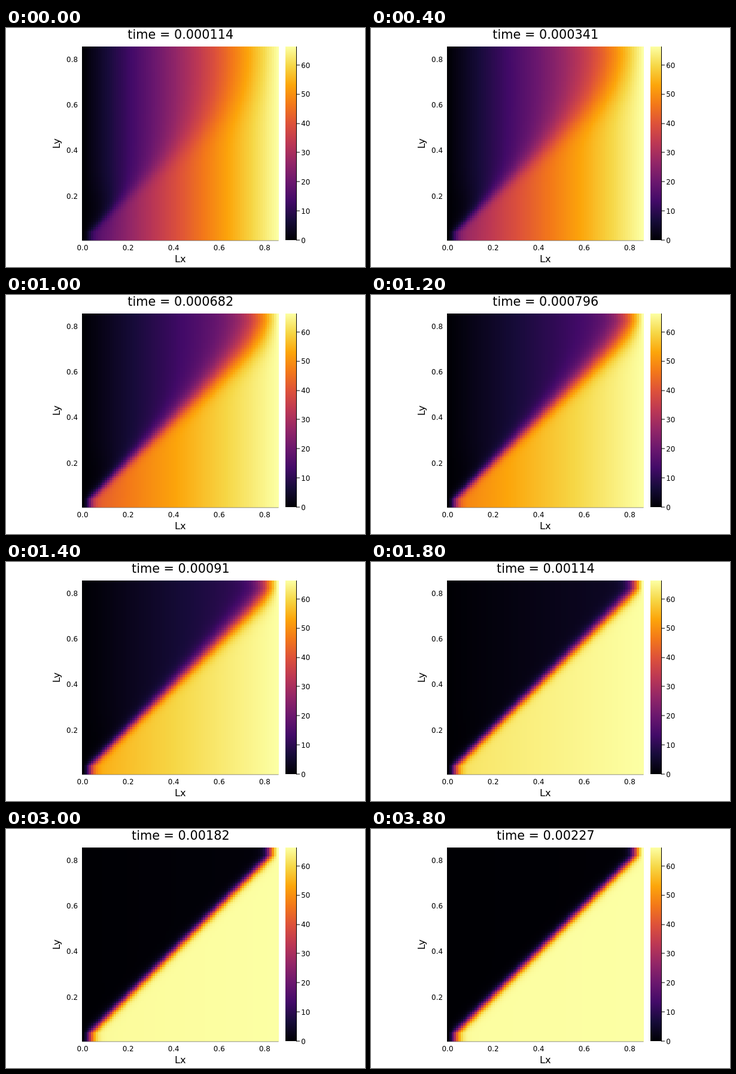
Animation, 600 px wide and 400 px high, one loop 4000 ms. Source, as an HTML page with a canvas:

```html
<!DOCTYPE html>
<html>
<head>
<meta charset="utf-8">
<style>
html, body { margin: 0; width: 100%; height: 100%; overflow: hidden; background: #fff; }
canvas { display: block; }
</style>
</head>
<body>
<canvas id="stage" width="600" height="400"></canvas>
<script>
const ctx = document.getElementById('stage').getContext('2d');
const STEPS = 20, STEP_MS = 200, DT = 0.00011372;
const N = 86, LEFT = 127, RIGHT = 455.5, TOP = 31, BOTTOM = 355.5;

const inferno = ['000004', '160b39', '420a68', '6a176e', '932667', 'bc3754',
  'dd513a', 'f37819', 'fca50a', 'f6d746', 'fcffa4']
  .map(h => [0, 2, 4].map(i => parseInt(h.slice(i, i + 2), 16)));

// Share of the initial linear ramp still left at a given step
const rampKeys = [[1, .79], [3, .63], [6, .385], [8, .19], [10, .07], [12, .03], [16, .01], [20, .004]];

const clamp = (v, lo, hi) => Math.min(hi, Math.max(lo, v));
const mix = (a, b, k) => a + (b - a) * k;

function rampShare(step) {
  const i = Math.max(1, rampKeys.findIndex(key => key[0] >= step));
  const [s0, v0] = rampKeys[i - 1], [s1, v1] = rampKeys[i];
  return mix(v0, v1, (step - s0) / (s1 - s0));
}

function color(v) {
  const p = clamp(v, 0, 1) * 10, i = Math.min(9, Math.floor(p));
  return `rgb(${inferno[i].map((c, j) => Math.round(mix(c, inferno[i + 1][j], p - i)))})`;
}

function text(str, x, y, size, align = 'center') {
  ctx.font = `${size}px "DejaVu Sans", sans-serif`;
  ctx.textAlign = align;
  ctx.fillStyle = '#000';
  ctx.fillText(str, x, y);
}

// A ramp in x that localises into a narrow band along the diagonal
function drawField(step) {
  const ramp = rampShare(step), spread = .45 * ramp ** 1.3;
  const edgeX = i => Math.round(mix(LEFT, RIGHT, i / N));
  const edgeY = j => Math.round(mix(BOTTOM, TOP, j / N));
  for (let j = 0; j < N; j++) {
    const y = j / (N - 1), center = clamp(y, .035, .965);
    const width = .03 + spread * y ** 1.8;
    const front = x => Math.tanh((x - center) / width);
    const lo = front(0), span = front(1) - lo;
    for (let i = 0; i < N; i++) {
      const x = i / (N - 1);
      const shadow = .6 * Math.exp(-(x * x + (y - .15) ** 2) / .02);
      const band = (front(x) - lo) / span;
      ctx.fillStyle = color(ramp * x * (1 - shadow) + (1 - ramp) * band);
      ctx.fillRect(edgeX(i), edgeY(j + 1), edgeX(i + 1) - edgeX(i), edgeY(j) - edgeY(j + 1));
    }
  }
  ctx.fillStyle = '#777';
  ctx.fillRect(LEFT, 355.5, RIGHT - LEFT, .8);
}

function drawAxes() {
  for (let k = 0; k <= 4; k++) {
    const label = (k * .2).toFixed(1);
    text(label, 128 + k * 76.1, 372, 11.9);
    if (k) text(label, 120, 361.7 - k * 76.2, 11.9, 'right');
  }
  text('Lx', 291.3, 392, 16.3);
  ctx.save();
  ctx.translate(90, 193.5);
  ctx.rotate(-Math.PI / 2);
  text('Ly', 0, 0, 16.3);
  ctx.restore();
}

function drawColorbar() {
  const fill = ctx.createLinearGradient(0, 355, 0, TOP);
  for (let i = 0; i <= 10; i++) fill.addColorStop(i / 10, color(i / 10));
  ctx.fillStyle = fill;
  ctx.fillRect(467, TOP, 18, 324);
  ctx.fillStyle = '#000';
  ctx.fillRect(485, TOP, 1, 324.5);
  for (let v = 0; v <= 60; v += 10) {
    const y = 355 - v * 4.885;
    ctx.fillStyle = '#000';
    ctx.fillRect(485, Math.round(y) - .5, 6, 1);
    text(v, 493.3, y + 4.7, 11.9, 'left');
  }
}

function draw(step) {
  ctx.fillStyle = '#fff';
  ctx.fillRect(0, 0, 600, 400);
  drawField(step);
  drawAxes();
  drawColorbar();
  text('time = ' + Number((step * DT).toPrecision(3)), 291.8, 18, 20.8);
}

const start = performance.now();
let shown = 0;
function tick() {
  const step = Math.floor((performance.now() - start) / STEP_MS) % STEPS + 1;
  if (step !== shown) draw(shown = step);
  requestAnimationFrame(tick);
}
tick();
</script>
</body>
</html>
```
